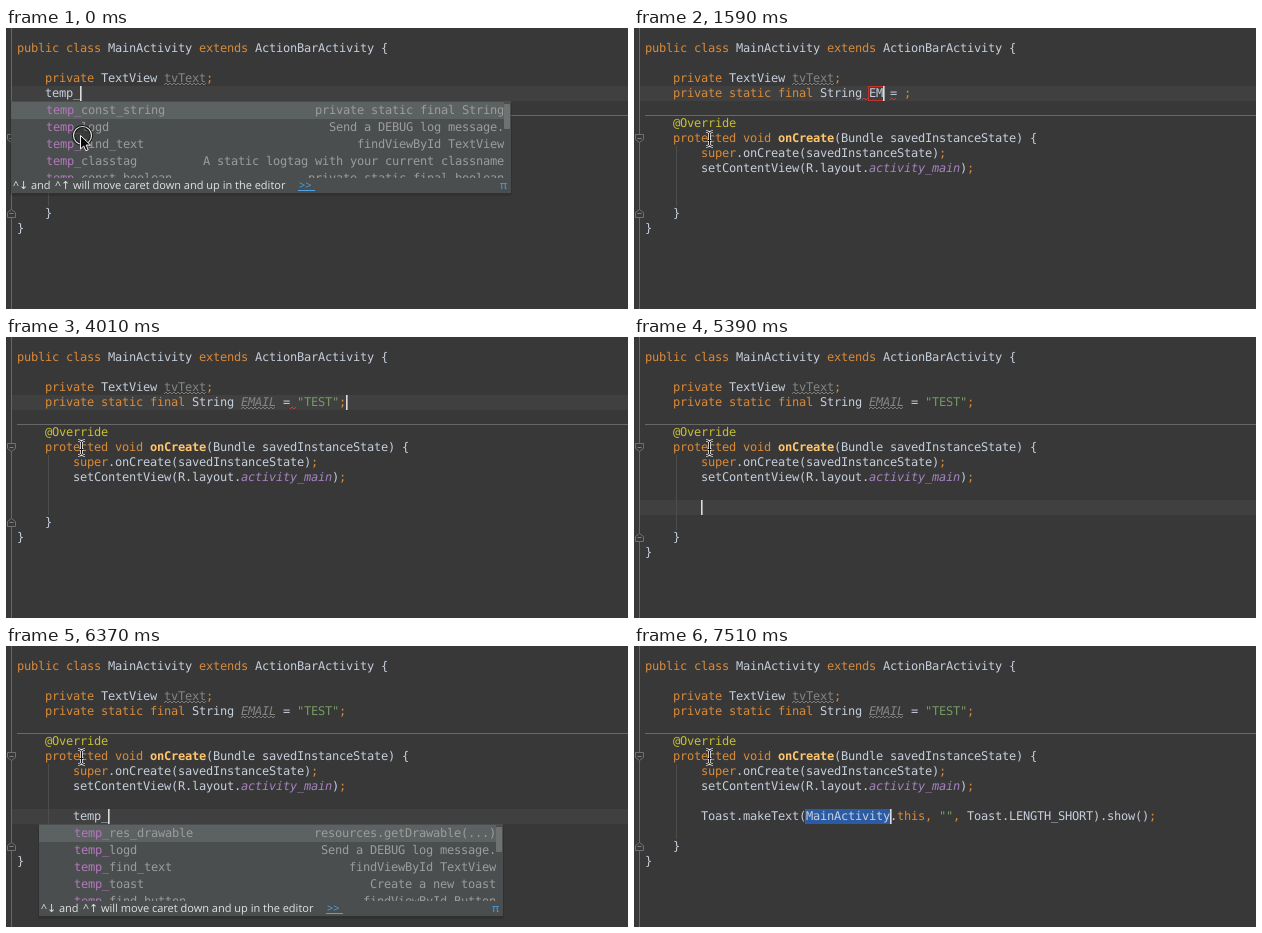
An HTML page for the animation above (8 s loop, 622 by 281 pixels).

```html
<!DOCTYPE html>
<html lang="en">
<head>
<meta charset="utf-8">
<title>Live templates in the editor</title>
<style>
html, body { margin: 0; width: 100%; height: 100%; overflow: hidden; background: #383838; }
svg { display: block; }
text { font: 12px "DejaVu Sans Mono", monospace; letter-spacing: -.225px; text-rendering: geometricPrecision; fill: #c5cedb; }
.key, .punct { fill: #d98a3a; }
.note { fill: #c8bf35; }
.def { fill: #ffc66d; font-weight: bold; }
.str { fill: #759a63; }
.field { fill: #a583c0; font-style: italic; }
.idle { fill: #858585; }
.idleField { fill: #858585; font-style: italic; }
.dim { fill: #8d8078; }
.match { fill: #b478bd; }
.item { fill: #9c9c9c; }
.hint { font: 11px "Open Sans", "Noto Sans", "DejaVu Sans", sans-serif; letter-spacing: 0; fill: #e2e2e2; }
.link { fill: #4ba3ea; }
</style>
</head>
<body>
<svg id="stage" width="622" height="281" viewBox="0 0 622 281"></svg>
<script>
const CELL = 7, ROW = 15, LEFT = 11, LOOP = 8000;
const KEYWORDS = new Set('public class extends private protected static final void super this'.split(' '));
const STYLES = { onCreate: 'def', activity_main: 'field', tvText: 'idle' };

const colX = n => LEFT + n * CELL;
const rowY = n => 13 + n * ROW;
const rect = (x, y, w, h, fill, more = '') =>
  `<rect x="${x}" y="${y}" width="${w}" height="${h}" fill="${fill}" ${more}/>`;
const line = (d, stroke, more = '') => `<path d="${d}" fill="none" stroke="${stroke}" ${more}/>`;
const put = (x, y, str, cls = '') => `<text x="${x}" y="${y}" class="${cls}">${str}</text>`;

function styleOf(word, extra) {
  if (word[0] === '"') return 'str';
  if (word[0] === '@') return 'note';
  if (extra[word]) return extra[word];
  if (word === ';' || word === ',') return 'punct';
  return KEYWORDS.has(word) ? 'key' : STYLES[word] || '';
}

function code(row, indent, src, extra = {}) {
  let out = '';
  for (const m of src.matchAll(/"[^"]*"|@?\w+|[;,]|[^\s\w";,@]+/g))
    out += put(colX(indent + m.index), rowY(row) + 11, m[0], styleOf(m[0], extra));
  return out;
}

const words = (x, y, src, cls) =>
  [...src.matchAll(/\S+/g)].map(m => put(x + m.index * CELL, y, m[0], cls)).join('');

function wave(x, end, row, color) {
  const y = rowY(row) + 14;
  let d = `M${x} ${y}`;
  for (let i = 1; x + i * 2 <= end; i++) d += `L${x + i * 2} ${y - (i % 2) * 2}`;
  return line(d, color, 'stroke-width=".9"');
}

const decl = (name, value) => `private static final String ${name} = ${value};`;

const FIND = ['temp_find_text', 'findViewById TextView'];
const LOGD = ['temp_logd', 'Send a DEBUG log message.'];
const TOAST = ['temp_toast', 'Create a new toast'];
const FIELD_LIST = { x: 5, y: 73, w: 500, h: 92, bar: true, items: [
  ['temp_const_string', 'private static final String'], LOGD, FIND,
  ['temp_classtag', 'A static logtag with your current classname'],
  ['temp_const_boolean', 'private static final boolean']] };
const BODY_LIST = { x: 33, y: 178, w: 464, h: 92, bar: true, items: [
  ['temp_res_drawable', 'resources.getDrawable(...)'], LOGD, FIND, TOAST,
  ['temp_find_button', 'findViewById Button']] };
const TOAST_LIST = { x: 33, y: 178, w: 464, h: 49, items: [TOAST, FIND] };

function popup({ x, y, w, h, items, bar }, typed) {
  let rows = rect(0, 1, w - (bar ? 7 : 0), 17, '#5c6162');
  items.forEach(([name, about], i) => {
    let n = 0;
    while (n < typed.length && typed[n] === name[n]) n++;
    const base = 13 + i * 17;
    rows += put(35, base, name.slice(0, n), 'match') + put(35 + n * CELL, base, name.slice(n), 'item')
      + words(w - 7 - about.length * CELL, base, about, 'item');
  });
  if (bar) rows += rect(w - 7, 3, 6, 25, '#707272', 'rx="1"');
  const base = h - 4;
  return rect(x - 1, y + 1, w + 2, h + 2, '#000', 'opacity=".12" rx="2"')
    + `<svg x="${x}" y="${y}" width="${w}" height="${h}">${rect(0, 0, w, h, '#4b4e4e')}`
    + `<svg width="${w}" height="${h - 15}">${rows}</svg>`
    + put(2, base, '^↓', 'hint') + put(20, base, 'and', 'hint') + put(44, base, '^↑', 'hint')
    + put(62, base, 'will move caret down and up in the editor', 'hint')
    + put(288, base, '&gt;&gt;', 'hint link') + line(`M287 ${base + 1.5}h17`, '#4ba3ea')
    + put(w - 11, base, 'π', 'hint link') + '</svg>';
}

function fold(row, up) {
  const y = rowY(row) + 7.5, s = up ? -1 : 1;
  return `<path d="M1.5 ${y - 4 * s}h8v${5 * s}l-4 ${3 * s}l-4 ${-3 * s}z" fill="#383838" stroke="#707070"/>`
    + line(`M3.5 ${y}h4`, '#808080');
}

const ARROW = '<path d="M74.5 107.5v13.5l3.2-3 2.1 4.7 2.4-1-2.1-4.6h4.4z" fill="#0b0b0b" stroke="#f2f2f2"/>';
const BEAM_PATH = 'M72 103.5q3 0 3.5 2v11q-.5 2-3.5 2M79 103.5q-3 0-3.5 2v11q.5 2 3.5 2M73.5 112.5h4';
const BEAM = line(BEAM_PATH, '#e8e8e8', 'stroke-width="2.6"') + line(BEAM_PATH, '#111');
const RING = '<circle cx="76.5" cy="107.5" r="9" fill="#222" fill-opacity=".45" stroke="#111" stroke-width="3"/>'
  + '<circle cx="76.5" cy="107.5" r="9" fill="none" stroke="#e6e6e6" stroke-width="1.2"/>';

const toastCall = 'Toast.makeText(MainActivity.this, "", Toast.LENGTH_SHORT).show();';

// Each step changes part of the state at its time.
const steps = [
  [0, { field: 'temp_', body: '', typed: 'temp_', row: 3, caret: 74, list: FIELD_LIST, ring: 1, beam: 0,
        red: [], box: null, name: '', semi: '', push: 0, picked: 0 }],
  [50, { ring: 0 }],
  [530, { list: null, caret: 0 }],
  [580, { beam: 1 }],
  [640, { field: decl('', ''), caret: 235, box: [235, 0] }],
  [1120, { red: [[228, 235]] }],
  [1180, { red: [[228, 235], [242, 249]] }],
  ...[1410, 1590, 1680, 1770, 1950].map((t, i) => {
    const n = i + 1, x = 235 + n * CELL;
    return [t, { field: decl('EMAIL'.slice(0, n), ''), caret: x, box: [235, n * CELL],
                 red: [[228, 235], [x + 7, x + 14]] }];
  }),
  [2240, { caret: 291, box: [291, 0], name: 'field' }],
  [2720, { red: [[228, 235], [284, 291]], box: null, semi: 'dim' }],
  [2770, { red: [[284, 291]], semi: '' }],
  [2830, { field: decl('EMAIL', '""'), caret: 298, box: [291, 14] }],
  [2890, { name: 'idleField' }],
  ...[3310, 3400, 3500, 3600].map((t, i) => [t, {
    field: decl('EMAIL', `"${'TEST'.slice(0, i + 1)}"`), caret: 305 + i * CELL, box: [291, 21 + i * CELL] }]),
  [4010, { caret: 340, box: null }],
  [4430, { row: 4, red: [] }],
  [4550, { row: 5 }],
  [4670, { row: 6 }],
  [4790, { row: 7 }],
  [4910, { row: 8 }],
  [5090, { row: 9 }],
  [5390, { row: 10, caret: 67, push: 1 }],
  [5930, { body: 't', typed: 't', caret: 74 }],
  [6000, { body: 'te', typed: 'te', caret: 81 }],
  [6070, { body: 'tem', typed: 'tem', caret: 88, list: BODY_LIST }],
  [6130, { body: 'temp', typed: 'temp', caret: 95 }],
  [6310, { body: 'temp_', caret: 102 }],
  [6370, { typed: 'temp_' }],
  [6850, { body: 'temp_t', typed: 'temp_t', caret: 109, list: TOAST_LIST }],
  [7330, { list: null, caret: 0 }],
  [7420, { body: toastCall, caret: 256, box: [172, 84] }],
  [7510, { picked: 1 }]
];

function draw(s) {
  const end = 11 + s.push;
  let out = rect(0, 0, 622, 281, '#383838');
  if (!s.picked) out += rect(6, rowY(s.row), 616, ROW, '#404040');
  out += line('M5.5 0v281', '#666') + line('M11 87.5H622', '#686868')
    + line(`M42.5 118V${rowY(end)}`, '#4d4d4d');
  if (s.box) out += rect(s.box[0] - .5, rowY(s.row) + .5, s.box[1] + 1, 14, 'none', 'stroke="#c8302c"');
  if (s.picked) out += rect(172, rowY(10), 85, ROW, '#2c5ba6');
  out += code(0, 0, 'public class MainActivity extends ActionBarActivity {')
    + code(2, 4, 'private TextView tvText;') + wave(158, 200, 2, '#858585')
    + code(3, 4, s.field, { EMAIL: s.name, ...(s.semi && { ';': s.semi }) })
    + code(5, 4, '@Override')
    + code(6, 4, 'protected void onCreate(Bundle savedInstanceState) {')
    + code(7, 8, 'super.onCreate(savedInstanceState);', { onCreate: ' ' })
    + code(8, 8, 'setContentView(R.layout.activity_main);')
    + code(10, 8, s.body) + code(end, 4, '}') + code(end + 1, 0, '}')
    + fold(6) + fold(end, true);
  if (s.name === 'idleField') out += wave(235, 270, 3, '#858585');
  for (const [a, b] of s.red) out += wave(a, b, 3, '#d0453f');
  if (s.caret) out += rect(s.caret, rowY(s.row), 1.6, ROW, '#dcdcdc');
  if (s.list) out += popup(s.list, s.typed);
  if (s.ring) out += RING;
  return out + (s.beam ? BEAM : ARROW);
}

const stage = document.getElementById('stage');
const states = [];
for (const [, change] of steps) states.push({ ...states[states.length - 1], ...change });

let shown = -1;
const begin = performance.now();
function tick() {
  const t = (performance.now() - begin) % LOOP;
  let i = steps.length - 1;
  while (steps[i][0] > t) i--;
  if (i !== shown) stage.innerHTML = draw(states[shown = i]);
  requestAnimationFrame(tick);
}
tick();
</script>
</body>
</html>
```
